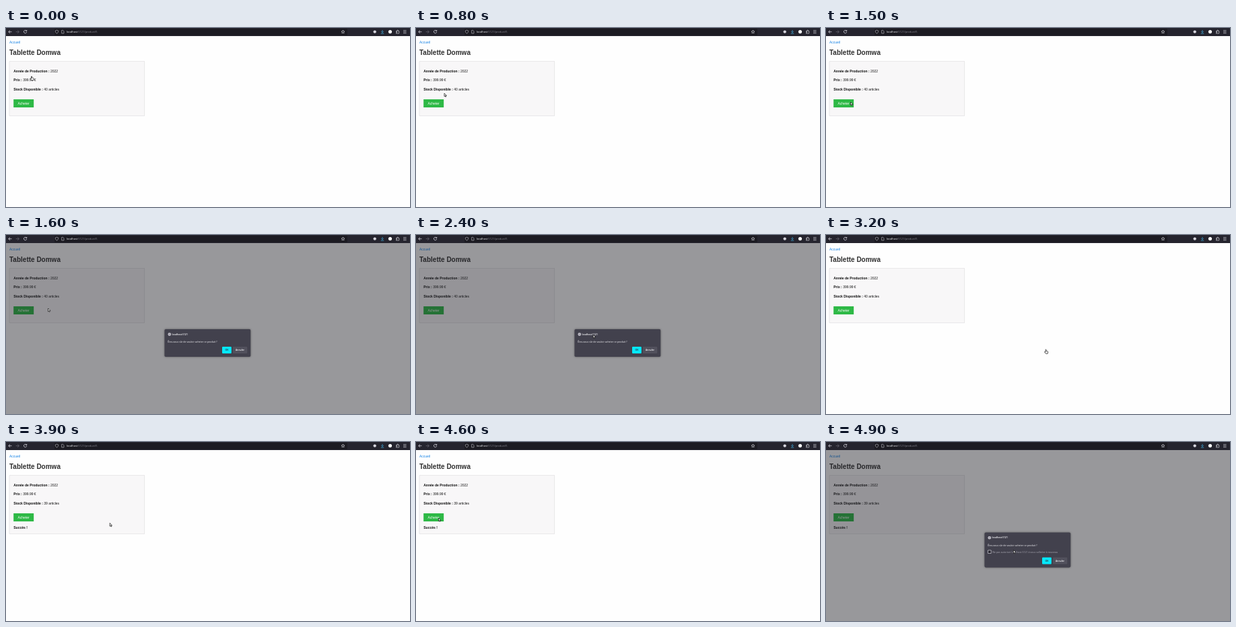
Write an HTML page with a canvas that moves like this. It is 600 by 266 pixels and loops after 5000 ms.

```html
<!DOCTYPE html>
<html lang="fr">
<head>
<meta charset="utf-8">
<style>
  html, body { margin: 0; width: 100%; height: 100%; overflow: hidden; background: #fefefe; }
  canvas { display: block; width: 600px; height: 266px; }
</style>
</head>
<body>
<canvas id="stage" width="600" height="266"></canvas>
<script>
const ctx = document.getElementById('stage').getContext('2d');
const LOOP = 5000, STEP = 100;
const PAGE_FONT = '"Liberation Sans", Arial, sans-serif';
const UI_FONT = '"Open Sans", "Noto Sans", sans-serif';
const ICON = '#e8e7ef';

// Pointer stops: time, x, y
const POINTER = [
  [0, 37.5, 71.5], [200, 37.5, 71.5], [800, 42, 97], [1300, 36.5, 110], [1500, 36.5, 110],
  [1600, 62.5, 109], [2100, 190, 131], [2600, 312, 160], [2800, 326, 170],
  [3300, 326, 170], [3800, 178, 122], [4400, 35, 113], [4600, 33.5, 113],
  [4700, 90, 124], [4800, 210, 148], [4900, 278.5, 160.5]
];

function box(x, y, w, h, fill, radius = 0) {
  ctx.fillStyle = fill;
  ctx.beginPath();
  ctx.roundRect(x, y, w, h, radius);
  ctx.fill();
}

function label(str, x, y, { size = 5, weight = 400, color = '#111', font = PAGE_FONT } = {}) {
  ctx.font = `${weight} ${size}px ${font}`;
  ctx.fillStyle = color;
  ctx.fillText(str, x, y);
  return x + ctx.measureText(str).width;
}

const uiLabel = (str, x, y, opts) =>
  label(str, x, y, { size: 3.5, color: '#fbfbfe', font: UI_FONT, ...opts });

function stroke(path, color = ICON, width = 0.7) {
  ctx.strokeStyle = color;
  ctx.lineWidth = width;
  ctx.stroke(new Path2D(path));
}

function dot(x, y, r, color) {
  ctx.fillStyle = color;
  ctx.beginPath();
  ctx.arc(x, y, r, 0, Math.PI * 2);
  ctx.fill();
}

function drawToolbar() {
  box(0, 0, 600, 12, '#25242e');
  box(72, 1, 435, 10, '#1c1b22', 1.2);
  stroke('M8.5 5.7H3.8M6 3.5L3.8 5.7L6 7.9');
  stroke('M14.7 5.7H19.4M17.2 3.5L19.4 5.7L17.2 7.9', '#6d6c76');
  stroke('M30.4 4.2A2.2 2.2 0 1 0 30.8 6M30.8 2.9V4.6H29');
  stroke('M75.5 3.2L77.7 4C77.7 6.2 77 7.4 75.5 8.2C74 7.4 73.3 6.2 73.3 4Z', '#c4c3cc', 0.6);
  stroke('M82.7 3.4H84.7L86 4.7V8H82.7Z', '#c4c3cc', 0.6);
  const end = uiLabel('localhost', 90, 7.2, { size: 3.9 });
  uiLabel(':5121/product/5', end, 7.2, { size: 3.9, color: '#8f8e98' });

  let star = '';
  for (let i = 0; i < 10; i++) {
    const r = i % 2 ? 1.2 : 2.6, a = i * Math.PI / 5 - Math.PI / 2;
    star += `${i ? 'L' : 'M'}${500.5 + r * Math.cos(a)} ${5.8 + r * Math.sin(a)}`;
  }
  stroke(star + 'Z', ICON, 0.6);
  dot(547.7, 5.6, 2.2, '#d5d4dc');
  stroke('M559 3V6.8M557.3 5.2L559 6.9L560.7 5.2M556.8 8.3H561.2', '#42b5e8');
  dot(570.5, 5.6, 2.6, '#fff');
  stroke('M579.5 4.5H581V3.2H582.3V4.5H583.8V8H579.5V6.8H580.7V5.7H579.5Z', ICON, 0.6);
  stroke('M590 3.7H594.6M590 5.7H594.6M590 7.7H594.6', ICON, 0.6);
}

function detail(name, value, y) {
  const end = label(name + ' : ', 11.25, y, { weight: 700 });
  label(value, end, y);
}

function drawPage(bought) {
  box(0, 12, 600, 254, '#fefefe');
  label('Accueil', 5, 23.1, { color: '#1683e6' });
  label('Tablette Domwa', 5, 40, { size: 10, weight: 700, color: '#303030' });

  const height = bought ? 87 : 81;
  box(4.7, 49.2, 201.4, height + 0.6, '#dbdadd', 0.8);
  box(5.3, 49.8, 200.2, height - 0.6, '#f8f7f8', 0.6);
  detail('Année de Production', '2022', 66.3);
  detail('Prix', '399.99 €', 79.4);
  detail('Stock Disponible', `${bought ? 39 : 40} articles`, 92.6);
  box(11.2, 106, 30, 12, '#2eb946');
  label('Acheter', 17.5, 113.9, { color: '#fff' });
  if (bought) label('Succès !', 11.25, 129, { weight: 700 });
}

function drawDialog(repeated, hoverOk) {
  const grow = repeated ? 5.4 : 0;
  const top = 140 - grow, buttons = 166 + grow;
  box(0, 12, 600, 254, 'rgba(28, 27, 34, 0.45)');

  ctx.save();
  ctx.shadowColor = 'rgba(0, 0, 0, 0.45)';
  ctx.shadowBlur = 3;
  box(235.5, top, 127.7, 41 + 2 * grow, '#42414d', 1.8);
  ctx.restore();

  const y = top + 7.6;
  dot(242.8, y, 2.3, '#d3d2da');
  stroke(`M240.6 ${y}H245M242.8 ${y - 2.2}V${y + 2.2}`, '#5b5a65', 0.4);
  uiLabel('localhost:5121', 246.5, top + 8.8, { size: 3.4, weight: 600 });
  uiLabel('Êtes-vous sûr de vouloir acheter ce produit ?', 240.3, top + 19.9, { size: 3.55 });

  if (repeated) {
    box(240.3, 160.5, 5.2, 5.4, '#c8c7d0', 0.7);
    box(241, 161.2, 3.8, 4, '#2b2a33', 0.3);
    uiLabel('Ne pas autoriser localhost:5121 à vous solliciter à nouveau', 247.3, 164.6,
      { size: 3.55, color: '#aaa9b3' });
  }

  box(321, buttons, 13.8, 10, hoverOk ? '#80ebff' : '#05e9fc', 1);
  uiLabel('OK', 325.4, buttons + 6.3, { weight: 600, color: '#2b2a33' });
  box(337, buttons, 21.3, 10, '#52515d', 1);
  uiLabel('Annuler', 341, buttons + 6.3, { size: 3.4, weight: 600 });
}

function pointerAt(t) {
  const next = POINTER.findIndex(p => p[0] > t);
  if (next < 0) return POINTER[POINTER.length - 1].slice(1);
  const [t0, x0, y0] = POINTER[next - 1], [t1, x1, y1] = POINTER[next];
  const k = (t - t0) / (t1 - t0);
  return [x0 + (x1 - x0) * k, y0 + (y1 - y0) * k];
}

function drawPointer(t) {
  const [x, y] = pointerAt(t);
  const hand = t < 300 || (t >= 2700 && t < 3400);
  const shape = new Path2D(hand
    ? 'M0 .5Q.6 -.3 1.1 .5V2.5L3.2 2.9Q3.8 3.1 3.7 3.8L3.2 6.3H.4L-1.5 3.9Q-1.4 3.2 -.7 3.5L0 4Z'
    : 'M0 0V4.7L1.1 3.7L1.9 5.4L2.7 5L1.9 3.4H3.4Z');
  ctx.save();
  ctx.translate(x, y);
  ctx.lineJoin = 'round';
  ctx.lineWidth = 0.7;
  ctx.strokeStyle = '#111';
  ctx.fillStyle = '#fff';
  ctx.fill(shape);
  ctx.stroke(shape);
  ctx.restore();
}

function draw(t) {
  const bought = t >= 3300;
  drawPage(bought);
  if ((t >= 1600 && t < 3200) || t >= 4700) drawDialog(bought, t >= 2700 && t < 3200);
  drawToolbar();
  drawPointer(t);
}

function frame() {
  const t = performance.now() % LOOP;
  draw(Math.floor(t / STEP) * STEP);
  requestAnimationFrame(frame);
}
frame();
</script>
</body>
</html>
```
